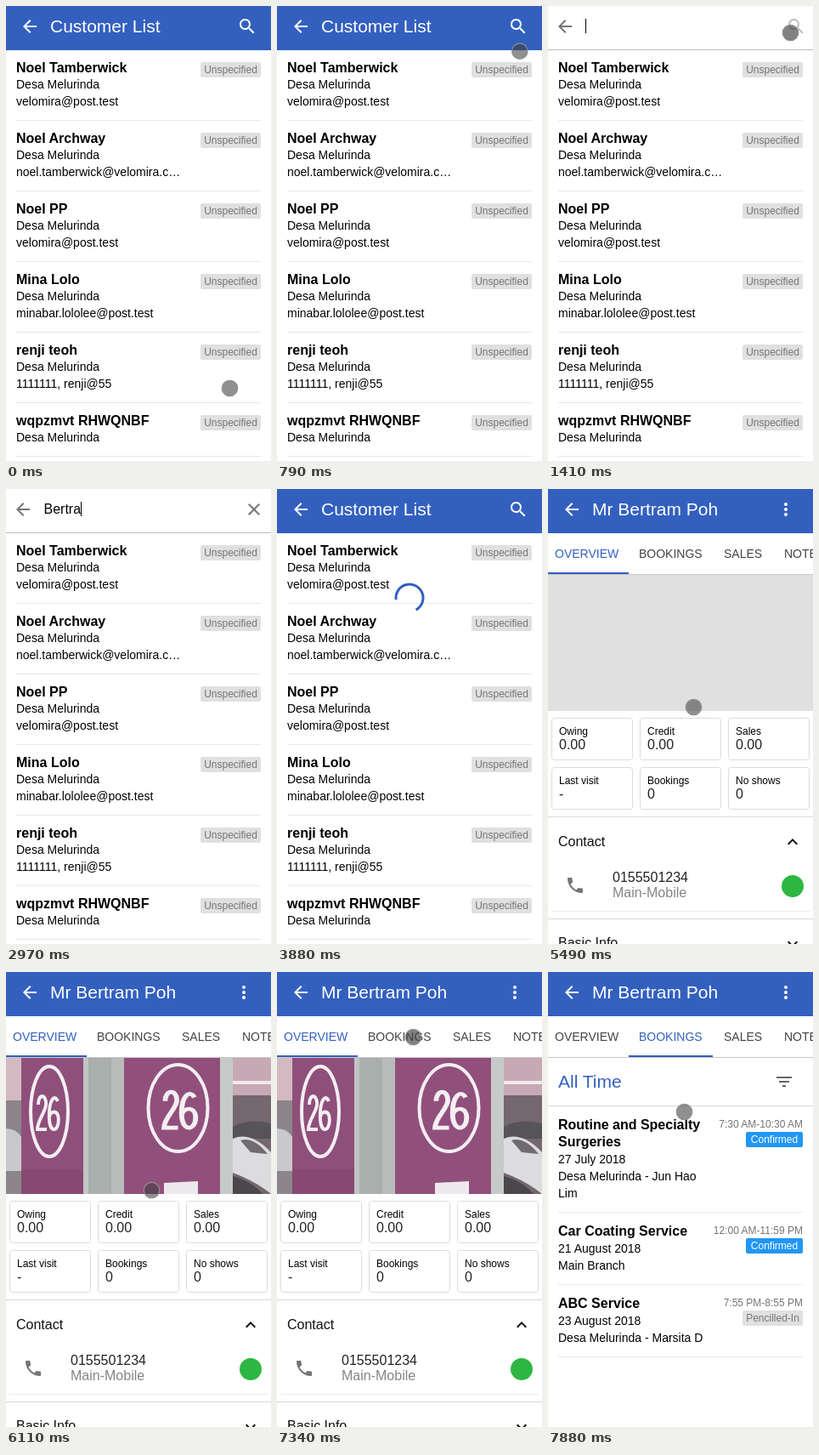
Recreate the animation shown at these times as an HTML page. Size 312 px wide and 535 px high, loop 8 s.

```html
<!DOCTYPE html>
<html lang="en">
<head>
<meta charset="utf-8">
<title>Customer search</title>
<style>
  html, body { margin: 0; width: 100%; height: 100%; overflow: hidden; background: #fff; }
  svg { display: block; width: 100%; height: 100%; }
  text { font-family: "Liberation Sans", Arial, sans-serif; white-space: pre; }
</style>
</head>
<body>
<svg id="stage" viewBox="0 0 312 535" xmlns="http://www.w3.org/2000/svg"></svg>
<script>
const LOOP = 8000;
const BLUE = '#3360bf', GRAY = '#757575', RULE = '#e8e8e8';
const PLACE = 'Desa Melurinda';
const QUERY = 'Bertram';
const CLIENT = 'Mr Bertram Poh';
const PHONE = '0155501234';

const ICONS = {
  back: 'M20 11H7.83l5.59-5.59L12 4l-8 8 8 8 1.41-1.41L7.83 13H20v-2z',
  search: 'M15.5 14h-.79l-.28-.27C15.41 12.59 16 11.11 16 9.5 16 5.91 13.09 3 9.5 3S3 5.91 3 9.5 5.91 16 9.5 16c1.61 0 3.09-.59 4.23-1.57l.27.28v.79l5 4.99L20.49 19l-4.99-5zm-6 0C7.01 14 5 11.99 5 9.5S7.01 5 9.5 5 14 7.01 14 9.5 11.99 14 9.5 14z',
  close: 'M19 6.41L17.59 5 12 10.59 6.41 5 5 6.41 10.59 12 5 17.59 6.41 19 12 13.41 17.59 19 19 17.59 13.41 12z',
  info: 'M12 2a10 10 0 1 0 0 20 10 10 0 0 0 0-20zm1 15h-2v-6h2v6zm0-8h-2V7h2v2z',
  more: 'M12 4a2 2 0 1 0 0 4 2 2 0 0 0 0-4zm0 6a2 2 0 1 0 0 4 2 2 0 0 0 0-4zm0 6a2 2 0 1 0 0 4 2 2 0 0 0 0-4z',
  up: 'M12 8l-6 6 1.41 1.41L12 10.83l4.59 4.58L18 14z',
  down: 'M16.59 8.59L12 13.17 7.41 8.59 6 10l6 6 6-6z',
  phone: 'M6.62 10.79c1.44 2.83 3.76 5.14 6.59 6.59l2.2-2.2c.27-.27.67-.36 1.02-.24 1.12.37 2.33.57 3.57.57.55 0 1 .45 1 1V20c0 .55-.45 1-1 1-9.39 0-17-7.61-17-17 0-.55.45-1 1-1h3.5c.55 0 1 .45 1 1 0 1.25.2 2.45.57 3.57.11.35.03.74-.25 1.02l-2.2 2.2z',
  filter: 'M10 18h4v-2h-4v2zM3 6v2h18V6H3zm3 7h12v-2H6v2z'
};

// Markup helpers
const text = (x, y, s, size = 14, fill = '#000', more = '') =>
  `<text x="${x}" y="${y}" font-size="${size}" fill="${fill}" ${more}>${s}</text>`;
const bold = (x, y, s) => text(x, y, s, 16, '#000', 'font-weight="700"');
const rect = (x, y, w, h, fill, more = '') =>
  `<rect x="${x}" y="${y}" width="${w}" height="${h}" fill="${fill}" ${more}/>`;
const rule = (y, x = 0, color = '#d8d8d8') => rect(x, y, 312 - 2 * x, 1, color);
const icon = (name, x, y, fill, more = '') =>
  `<path d="${ICONS[name]}" transform="translate(${x} ${y})" fill="${fill}" ${more}/>`;
const group = (id, inner, more = '') => `<g id="${id}" ${more}>${inner}</g>`;

function badge(y, label) {
  const w = label.length > 9 ? 71 : 67;
  const on = label === 'Confirmed';
  return rect(300 - w, y, w, 18, on ? '#2196f3' : '#e0e0e0', 'rx="2"') +
    text(300 - w / 2, y + 13, label, 12, on ? '#fff' : GRAY, 'text-anchor="middle"');
}

function customer(y, name, contact, label = 'Unspecified') {
  return bold(12, y + 26, name) + text(12, y + 45, PLACE) +
    (contact ? text(12, y + 65, contact) : '') +
    badge(y + 14, label) + rule(y + (contact ? 82 : 62), 12, RULE);
}

function booking(y, titles, lines, time, status) {
  let base = y + 27, out = '';
  titles.forEach(s => { out += bold(12, base, s); base += 20; });
  lines.forEach(s => { out += text(12, base, s); base += 20; });
  return out + text(300, y + 25, time, 12, GRAY, 'text-anchor="end"') +
    badge(y + 30, status) + rule(base - 3, 12, RULE);
}

function card(col, row, label, value) {
  const x = 4 + col * 104, y = 269 + row * 58;
  return rect(x + .5, y + .5, 95, 49, '#fff', 'rx="3" stroke="#dcdcdc"') +
    text(x + 9, y + 20, label, 12) + text(x + 9, y + 37, value, 16, '#222');
}

const header = title => rect(0, 0, 312, 52, BLUE) +
  icon('back', 16, 12, '#fff') + text(52, 31, title, 21, '#fff');

function numeral(x, y, sx, sy) {
  return `<path d="M1 10C1 -3 11 -3 11 9C11 18 0 28 0 39H12M26 6C22 -3 15 4 15 23C15 45 27 42 27 28C27 16 17 16 15 25"
    transform="translate(${x} ${y}) scale(${sx} ${sy})" fill="none" stroke="#f4eef2" stroke-width="4.2"/>`;
}

function photo() {
  const ring = (cx, cy, rx, ry) =>
    `<ellipse cx="${cx}" cy="${cy}" rx="${rx}" ry="${ry}" fill="none" stroke="#f4eef2" stroke-width="4"/>`;
  return rect(0, 101, 312, 160, '#b5a5ab') +
    rect(0, 101, 18, 50, '#d3b9c2') + rect(0, 151, 18, 110, '#8b858a') +
    '<path d="M0 184Q12 184 18 194V234H0z" fill="#c9c9cc"/>' +
    rect(18, 101, 73, 160, '#8f4f7b') + rect(18, 232, 73, 29, '#874973') +
    rect(91, 101, 48, 160, '#a9afad') + rect(91, 101, 6, 160, '#c2c5c4') + rect(124, 101, 15, 160, '#b7bcba') +
    rect(139, 101, 113, 160, '#91507c') +
    rect(252, 101, 15, 160, '#c6cbca') +
    rect(267, 101, 45, 44, '#c6a9b4') + rect(267, 128, 45, 4, '#f5e9ee') + rect(267, 145, 45, 116, '#75676e') +
    '<path d="M267 182Q284 172 312 178V196H267z" fill="#565359"/>' +
    '<path d="M267 196Q288 187 312 212V261Q294 246 267 236z" fill="#dcdcdf"/>' +
    '<path d="M276 198Q291 193 308 214L288 212z" fill="#6e6b72"/>' +
    '<path d="M267 240Q290 246 302 261H267z" fill="#4b474d"/>' +
    ring(51, 164, 22, 53) + ring(202.5, 160, 35, 51) +
    numeral(37, 146, .92, 1) + numeral(186, 141, 1.38, 1.08) +
    '<path d="M186 248L226 246V261H186z" fill="#ece9ec"/>';
}

const customers = [
  ['Noel Tamberwick', 'velomira@post.test'],
  ['Noel Archway', 'noel.tamberwick@velomira.c…'],
  ['Noel PP', 'velomira@post.test'],
  ['Mina Lolo', 'minabar.lololee@post.test'],
  ['renji teoh', '1111111, renji@55'],
  ['wqpzmvt RHWQNBF', '']
];

const listPage = customers.map((c, i) => customer(52 + 83 * i, ...c)).join('');

const resultsPage = rect(0, 52, 312, 40, '#eceeee') + icon('info', 4, 60, GRAY) +
  text(36, 77, `2 results found for "${QUERY}"`, 16) +
  rect(4.5, 100.5, 303, 35, '#fff', 'stroke="#e0e0e0"') +
  text(156, 123, 'CLEAR FILTER', 14, '#222', 'text-anchor="middle"') +
  rect(0, 207, 312, 82, '#eee', 'id="press"') +
  customer(144, 'bertram test poh', '') + customer(207, CLIENT, PHONE, 'VIP');

const overview = rect(0, 101, 312, 160, '#e0e0e0') + group('photo', photo()) +
  card(0, 0, 'Owing', '0.00') + card(1, 0, 'Credit', '0.00') + card(2, 0, 'Sales', '0.00') +
  card(0, 1, 'Last visit', '-') + card(1, 1, 'Bookings', '0') + card(2, 1, 'No shows', '0') +
  rule(385) + text(12, 420, 'Contact', 16, '#111') + icon('up', 276, 403, '#111') +
  icon('phone', 20, 454, GRAY) + text(76, 462, PHONE, 16, '#222') +
  text(76, 480, 'Main-Mobile', 16, '#858585') +
  '<circle cx="288" cy="467" r="13" fill="#2db742"/>' +
  rule(496, 4, '#ececec') + rule(505) +
  text(12, 539, 'Basic Info', 16, '#111') + icon('down', 276, 523, '#111');

const bookings = text(12, 136, 'All Time', 21, BLUE) + icon('filter', 266, 117, '#666') + rule(157) +
  booking(158, ['Routine and Specialty', 'Surgeries'],
    ['27 July 2018', PLACE + ' - Jun Hao', 'Lim'], '7:30 AM-10:30 AM', 'Confirmed') +
  booking(283, ['Car Coating Service'], ['21 August 2018', 'Main Branch'], '12:00 AM-11:59 PM', 'Confirmed') +
  booking(368, ['ABC Service'], ['23 August 2018', PLACE + ' - Marsita D'], '7:55 PM-8:55 PM', 'Pencilled-In');

const tabs = rect(0, 52, 312, 49, '#fff') + rule(100, 0, '#c8c8c8') +
  text(8, 81, 'OVERVIEW', 14, BLUE, 'id="tabA"') + text(107, 81, 'BOOKINGS', 14, BLUE, 'id="tabB"') +
  text(207, 81, 'SALES', 14, '#444') + text(278, 81, 'NOTES', 14, '#444') +
  rect(0, 98, 95, 2, BLUE, 'id="marker"');

const searchBar = rect(0, 0, 312, 52, '#fff') + rule(51, 0, '#bdbdbd') +
  icon('back', 8, 12, GRAY) + icon('search', 280, 12, '#bdbdbd', 'id="lens"') +
  icon('close', 280, 12, GRAY, 'id="clear"') +
  text(44.5, 29, '', 16, '#000', 'id="typed"') + rect(44, 15, 1, 17, '#000', 'id="caret"');

const stage = document.getElementById('stage');
stage.innerHTML = rect(0, 0, 312, 535, '#fff') +
  group('list', listPage) + group('results', resultsPage) +
  group('listHeader', header('Customer List') + icon('search', 272, 12, '#fff')) +
  group('searchBar', searchBar) +
  `<path id="spinner" fill="none" stroke="${BLUE}" stroke-width="3"/>` +
  group('detail', rect(0, 0, 312, 535, '#fff') + group('overview', overview) + group('bookings', bookings) +
    tabs + header(CLIENT) + icon('more', 268, 12, '#fff')) +
  '<circle id="pointer" r="9.2" fill="#3c3c3c" stroke="#8f8f8f" stroke-width="1.2"/>';

const el = {};
stage.querySelectorAll('[id]').forEach(n => { el[n.id] = n; });

const show = (node, on) => node.setAttribute('display', on ? 'inline' : 'none');
const span = (t, a, b) => Math.min(1, Math.max(0, (t - a) / (b - a)));
const easeOut = p => 1 - (1 - p) ** 3;
const easeInOut = p => (1 - Math.cos(Math.PI * p)) / 2;

// Pointer path: time, x, y
const PATH = [
  [0, 263.5, 449.5], [89, 263.5, 449.5], [90, 266, 380], [260, 278, 123], [489, 279, 122],
  [490, 280, 110], [850, 287, 42], [1180, 285.5, 31.5], [4259, 285.5, 31.5],
  [4260, 266, 46], [4420, 241, 73], [4649, 241, 74], [4650, 228, 101], [4800, 191.5, 183.5],
  [4879, 191.5, 183.5], [4960, 180, 228], [5190, 171.5, 256.5], [6179, 171.5, 256.5],
  [6180, 180, 215], [6410, 226, -12], [6639, 226, -12], [6640, 224, 0], [6900, 185, 55],
  [7190, 160.5, 76.5], [7580, 160.5, 76.5], [7860, 160.5, 164.5], [8000, 160.5, 164.5]
];
const KEYS = [2110, 2380, 2470, 2570, 2740, 2970, 3030];

function pointerAt(t) {
  const i = Math.max(1, PATH.findIndex(k => k[0] > t));
  const [a, b] = [PATH[i - 1], PATH[i]];
  const p = span(t, a[0], b[0]);
  return [a[1] + (b[1] - a[1]) * p, a[2] + (b[2] - a[2]) * p];
}

function arc(from, sweep) {
  const at = deg => {
    const r = deg * Math.PI / 180;
    return `${156 + 16 * Math.cos(r)} ${128 + 16 * Math.sin(r)}`;
  };
  return `M${at(from)}A16 16 0 ${sweep > 180 ? 1 : 0} 1 ${at(from + sweep)}`;
}

function draw(t) {
  const searching = t >= 1410 && t < 3430;
  const found = t >= 3960;
  show(el.list, !found);
  show(el.results, found);
  show(el.listHeader, !searching);
  show(el.searchBar, searching);
  show(el.press, t >= 5420);
  show(el.detail, t >= 5490);

  const count = KEYS.filter(k => t >= k).length;
  el.typed.textContent = QUERY.slice(0, count);
  const end = count ? el.typed.getComputedTextLength() : 0;
  el.caret.setAttribute('x', Math.floor(44.5 + end));
  show(el.caret, t < 1880 || count > 0);
  show(el.lens, count === 0);
  show(el.clear, count > 0);

  const loading = t >= 3430 && !found;
  show(el.spinner, loading);
  if (loading) {
    const sweep = 4 + 266 * easeInOut(span(t, 3430, 3980));
    el.spinner.setAttribute('d', arc(172 + (t - 3880) * 360 / 1400, sweep));
  }

  el.photo.setAttribute('opacity', span(t, 5740, 6000));
  const p = easeOut(span(t, 7400, 7770));
  el.overview.setAttribute('transform', `translate(${-312 * p} 0)`);
  el.bookings.setAttribute('transform', `translate(${312 * (1 - p)} 0)`);
  el.marker.setAttribute('x', 95 * p);
  el.marker.setAttribute('width', 95 + 4 * p);
  const onB = t >= 7420;
  el.tabA.setAttribute('fill', onB ? '#444' : BLUE);
  el.tabB.setAttribute('fill', onB ? BLUE : '#444');

  const [x, y] = pointerAt(t);
  const pressed = (t >= 1180 && t < 1880) || (t >= 7340 && t < 7500);
  show(el.pointer, t < 1880 || t >= 4260);
  el.pointer.setAttribute('cx', x);
  el.pointer.setAttribute('cy', y);
  el.pointer.setAttribute('fill-opacity', pressed ? .64 : .57);
}

const start = performance.now();
function tick() {
  draw((performance.now() - start) % LOOP);
  requestAnimationFrame(tick);
}
tick();
</script>
</body>
</html>
```
